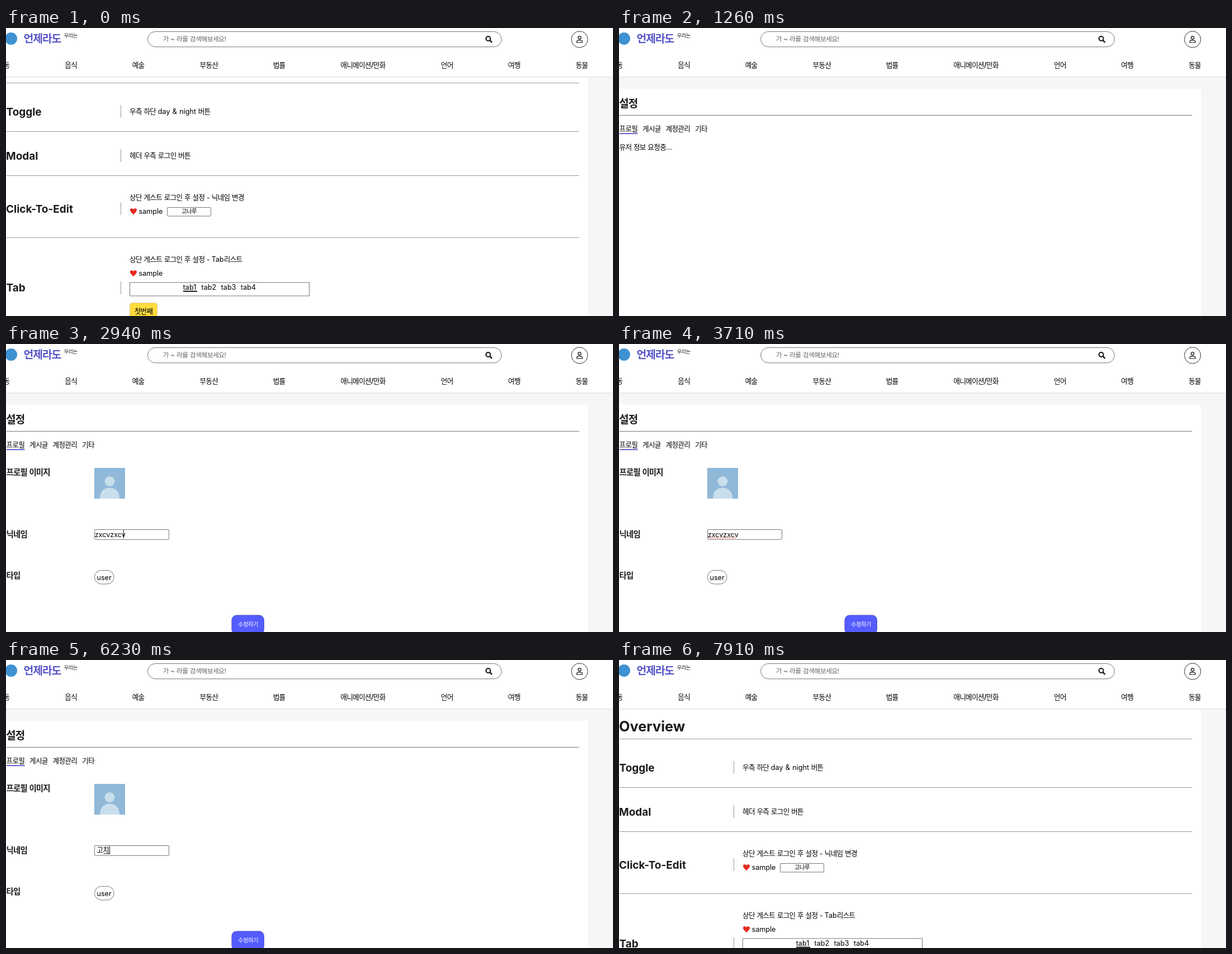
Recreate the animation shown at these times as an HTML page. Size 1086 px wide and 516 px high, loop 8 s.

```html
<!DOCTYPE html>
<html lang="ko">
<head>
<meta charset="utf-8">
<title>설정</title>
<style>
html, body { margin: 0; width: 100%; height: 100%; overflow: hidden; background: #fff; }
svg { display: block; width: 100vw; height: 100vh; }
text {
  font: 12.6px Inter, "Noto Sans CJK KR", "Noto Sans CJK", sans-serif;
  letter-spacing: -.054em; word-spacing: .06em; fill: #000; white-space: pre;
}
.l { letter-spacing: 0; }
.h1, .h2, .h3, .brand { font-weight: 700; fill: #1b1b1b; }
.h1 { font-size: 25.3px; }
.h2 { font-size: 18.95px; }
.h3 { font-size: 14.4px; }
.brand { font-size: 19.3px; fill: #5754c6; }
.nav { font-weight: 500; }
.tag { font-size: 9.3px; fill: #222; }
.hint { font-size: 11.85px; fill: #666; }
.small { font-size: 10.4px; text-anchor: middle; }
.mid { text-anchor: middle; }
.box { fill: #fff; stroke: #767676; }
.rule { stroke: #999; fill: none; }
.accent { fill: #5452c4; }

/* Timed parts: 8 s loop with hard changes */
.s { visibility: hidden; animation: 8s step-end infinite; }
#overview { animation-name: overview; }
#menu { animation-name: menu; }
#hover { animation-name: hover; }
#settings { animation-name: settings; }
#loading { animation-name: loading; }
#label { animation-name: label; }
#rows { animation-name: rows; }
#avatar { animation-name: avatar; }
#field { animation-name: field; }
#old { animation-name: old; }
#pick { animation-name: pick; }
#spell { animation-name: spell; }
#slip { animation-name: slip; }
#t1 { animation-name: t1; }
#t2 { animation-name: t2; }
#t3 { animation-name: t3; }
#t4 { animation-name: t4; }
#t5 { animation-name: t5; }
#compose { animation-name: compose; }
#caret { animation-name: caret; }

@keyframes overview {
  0% { visibility: visible; transform: none; }
  15.75% { visibility: hidden; transform: translateY(43px); }
  98%, 100% { visibility: visible; transform: translateY(43px); }
}
@keyframes menu { 3.5% { visibility: visible; } 15.75% { visibility: hidden; } }
@keyframes hover { 10.5% { visibility: visible; } 15.75% { visibility: hidden; } }
@keyframes settings { 15.75% { visibility: visible; } 98% { visibility: hidden; } }
@keyframes loading { 15.75% { visibility: visible; } 18.375% { visibility: hidden; } }
@keyframes label { 18.375% { visibility: visible; } 98% { visibility: hidden; } }
@keyframes rows {
  0% { transform: translateY(-35px); }
  18.375% { visibility: visible; transform: translateY(-35px); }
  21% { visibility: visible; transform: none; }
  98%, 100% { visibility: hidden; transform: none; }
}
@keyframes avatar { 21% { visibility: visible; } 98% { visibility: hidden; } }
@keyframes field { 36.75% { visibility: visible; } 94.5% { visibility: hidden; } }
@keyframes old { 18.375% { visibility: visible; } 56.875% { visibility: hidden; } }
@keyframes spell { 40.25% { visibility: visible; } 56.875% { visibility: hidden; } }
@keyframes pick { 49.875% { visibility: visible; } 56.875% { visibility: hidden; } }
@keyframes slip { 56.875% { visibility: visible; } 60.375% { visibility: hidden; } }
@keyframes t1 { 73.5% { visibility: visible; } 74.375% { visibility: hidden; } }
@keyframes t2 { 74.375% { visibility: visible; } 77.875% { visibility: hidden; } }
@keyframes t3 { 77.875% { visibility: visible; } 81.375% { visibility: hidden; } }
@keyframes t4 { 81.375% { visibility: visible; } 82.25% { visibility: hidden; } }
@keyframes t5 { 82.25% { visibility: visible; } 98% { visibility: hidden; } }
@keyframes compose {
  56.875% { visibility: visible; transform: translateX(159px); }
  60.375% { visibility: hidden; }
  73.5% { visibility: visible; transform: translateX(163px); }
  77.875% { visibility: visible; transform: translateX(174.5px); }
  81.375% { visibility: visible; transform: translateX(185.5px); }
  94.5% { visibility: hidden; }
}
@keyframes caret {
  36.75% { visibility: visible; transform: translateX(210px); }
  43.75% { visibility: hidden; }
  56.875% { visibility: visible; transform: translateX(171px); }
  60.375% { visibility: visible; transform: translateX(163px); }
  67.375% { visibility: hidden; }
  73.5% { visibility: visible; transform: translateX(174px); }
  77.875% { visibility: visible; transform: translateX(185px); }
  81.375% { visibility: visible; transform: translateX(197px); }
  89.25% { visibility: hidden; }
}
</style>
</head>
<body>
<svg viewBox="0 0 1086 516">
  <defs>
    <path id="heart" d="M0 5.5C-3 3-6-.2-6-2.6C-6-5.6-2-6.4 0-3.4C2-6.4 6-5.6 6-2.6C6-.2 3 3 0 5.5Z" fill="#e8281f"/>
  </defs>
  <rect width="1086" height="516" fill="#f6f6f6"/>

  <g id="overview" class="s">
    <rect y="20" width="1041" height="520" fill="#fff"/>
    <path class="rule" d="M1 98.5H1025.5M1 185.5H1025.5M1 264.5H1025.5M1 375.5H1025.5"/>
    <path class="rule" d="M205.5 138V161M205.5 217V240M205.5 312V335M205.5 454V477"/>
    <text class="h1 l" x="0" y="84.5">Overview</text>
    <text class="h2 l" x="0.5" y="156.5">Toggle</text>
    <text class="h2 l" x="0" y="235.5">Modal</text>
    <text class="h2 l" x="0" y="330.8">Click-To-Edit</text>
    <text class="h2 l" x="0.5" y="472.3">Tab</text>

    <text x="221" y="153.6">우측 하단 <tspan class="l">day &amp; night</tspan> 버튼</text>
    <text x="221" y="232.6">헤더 우측 로그인 버튼</text>
    <text x="221" y="308">상단 게스트 로그인 후 설정 - 닉네임 변경</text>
    <use href="#heart" x="228" y="328.5"/>
    <text class="l" x="237.5" y="332.6">sample</text>
    <rect class="box" x="288.5" y="321.5" width="78" height="15.5" rx="1.5"/>
    <text class="small" x="327.5" y="332">고나루</text>

    <text x="221" y="419">상단 게스트 로그인 후 설정 - <tspan class="l">Tab</tspan>리스트</text>
    <use href="#heart" x="228" y="439.5"/>
    <text class="l" x="237.5" y="443.6">sample</text>
    <rect class="box" x="221.5" y="456" width="321" height="24"/>
    <text class="l" x="316.7" y="468.6">tab1</text>
    <text class="l" x="349.6" y="468.6">tab2</text>
    <text class="l" x="384.7" y="468.6">tab3</text>
    <text class="l" x="420" y="468.6">tab4</text>
    <rect x="317" y="470.7" width="25" height="2" fill="#111"/>
    <rect x="221.5" y="492.5" width="49" height="29" rx="4" fill="#ffdb3d" stroke="#ddd0a0"/>
    <text class="mid" x="246" y="511.6">첫번째</text>
  </g>

  <g id="settings" class="s">
    <rect y="109" width="1041" height="407" fill="#fff"/>
    <text class="h2" x="0.3" y="142.3">설정</text>
    <path class="rule" d="M1 156.5H1025.5" stroke-width="1.4"/>
    <text x="0.5" y="184.6">프로필</text>
    <text x="42" y="184.6">게시글</text>
    <text x="83.5" y="184.6">계정관리</text>
    <text x="136" y="184.6">기타</text>
    <rect class="accent" x="1" y="188.3" width="32.5" height="1.8"/>
  </g>
  <text id="loading" class="s" x="0.5" y="218.2">유저 정보 요청중<tspan class="l">...</tspan></text>
  <text id="label" class="s h3" x="0.5" y="235.4">프로필 이미지</text>

  <g id="avatar" class="s">
    <rect x="158" y="222" width="55" height="55" fill="#90b8d8"/>
    <circle cx="185.5" cy="246" r="9" fill="#c8deec"/>
    <path d="M168 277C168 264 175 257.5 185.5 257.5S203 264 203 277Z" fill="#c8deec"/>
  </g>

  <g id="rows" class="s">
    <text class="h3" x="0.5" y="346">닉네임</text>
    <text class="h3" x="0.5" y="419.5">타입</text>
    <rect class="box" x="158.5" y="405.5" width="34.5" height="24.5" rx="12"/>
    <text class="l" x="162.5" y="422.5">user</text>
    <rect x="404" y="486" width="57.5" height="34" rx="8.5" fill="#545cff" stroke="#4a50c8"/>
    <text class="small" x="433" y="505.7" style="fill:#fff">수정하기</text>

    <rect id="field" class="s box" x="158.5" y="332.5" width="133" height="17.8" rx="1.5"/>
    <rect id="pick" class="s" x="159" y="334" width="52" height="15" fill="#b3d7ff"/>
    <text id="old" class="s l" x="158.7" y="345.6">zxcvzxcv</text>
    <path id="spell" class="s" d="M160 347.6H210.5" stroke="#e0453c" stroke-width="1.5" stroke-dasharray="1.5"/>
    <text id="slip" class="s" x="159" y="345.3">ㄱ</text>
    <text id="t1" class="s" x="162.3" y="345.3">ㄱ</text>
    <text id="t2" class="s" x="162.3" y="345.3">고</text>
    <text id="t3" class="s" x="162.3" y="345.3">고치</text>
    <text id="t4" class="s" x="162.3" y="345.3">고치ㄱ</text>
    <text id="t5" class="s" x="162.3" y="345.3">고치기</text>
    <rect id="compose" class="s" y="346.5" width="11.5" height="1" fill="#111"/>
    <rect id="caret" class="s" y="333.5" width="1" height="14.5" fill="#111"/>
  </g>

  <g>
    <rect width="1086" height="87.5" fill="#fff"/>
    <rect y="87" width="1086" height="2" fill="#e9e9e9"/>
    <circle cx="9" cy="19" r="11" fill="#3f92d2"/>
    <text class="brand" x="31.5" y="26.3">언제라도</text>
    <text class="tag" x="103.7" y="17">우리는</text>
    <rect class="box" x="253.5" y="6.5" width="633" height="27.3" rx="13.6"/>
    <text class="hint" x="280.7" y="24.2">가 ~ 라를 검색해보세요!</text>
    <g fill="none" stroke="#111">
      <circle cx="862.7" cy="19" r="4" stroke-width="2"/>
      <path d="M865.8 22.2L869.6 26" stroke-width="2.4"/>
      <circle cx="1026.2" cy="20.4" r="14.6" stroke="#333"/>
      <circle cx="1026.2" cy="17.2" r="2.6" stroke-width="1.2"/>
      <path d="M1021.2 26V25C1021.2 22.8 1022.7 21.8 1024.700 21.8H1027.7C1029.7 21.8 1031.2 22.8 1031.2 25V26Z" stroke-width="1.2" stroke-linejoin="round"/>
    </g>
    <text class="nav" x="-4.6" y="71.2">동</text>
    <text class="nav" x="105.3" y="71.2">음식</text>
    <text class="nav" x="225.7" y="71.2">예술</text>
    <text class="nav" x="346.6" y="71.2">부동산</text>
    <text class="nav" x="477.7" y="71.2">법률</text>
    <text class="nav" x="598.5" y="71.2">애니메이션/만화</text>
    <text class="nav" x="778" y="71.2">언어</text>
    <text class="nav" x="898.3" y="71.2">여행</text>
    <text class="nav" x="1019.2" y="71.2">동물</text>
  </g>

  <g id="menu" class="s">
    <rect x="945.5" y="37.5" width="94" height="156" rx="6" fill="#fff" stroke="#ccc"/>
    <text class="mid" x="1000.5" y="75">내 정보</text>
    <text class="mid" x="1000.5" y="105">설정</text>
    <text class="mid" x="1000.5" y="135">글쓰기</text>
    <text class="mid" x="1000.5" y="165">로그아웃</text>
  </g>
  <rect id="hover" class="s accent" x="989" y="108.3" width="23" height="1.7"/>
</svg>
</body>
</html>
```
